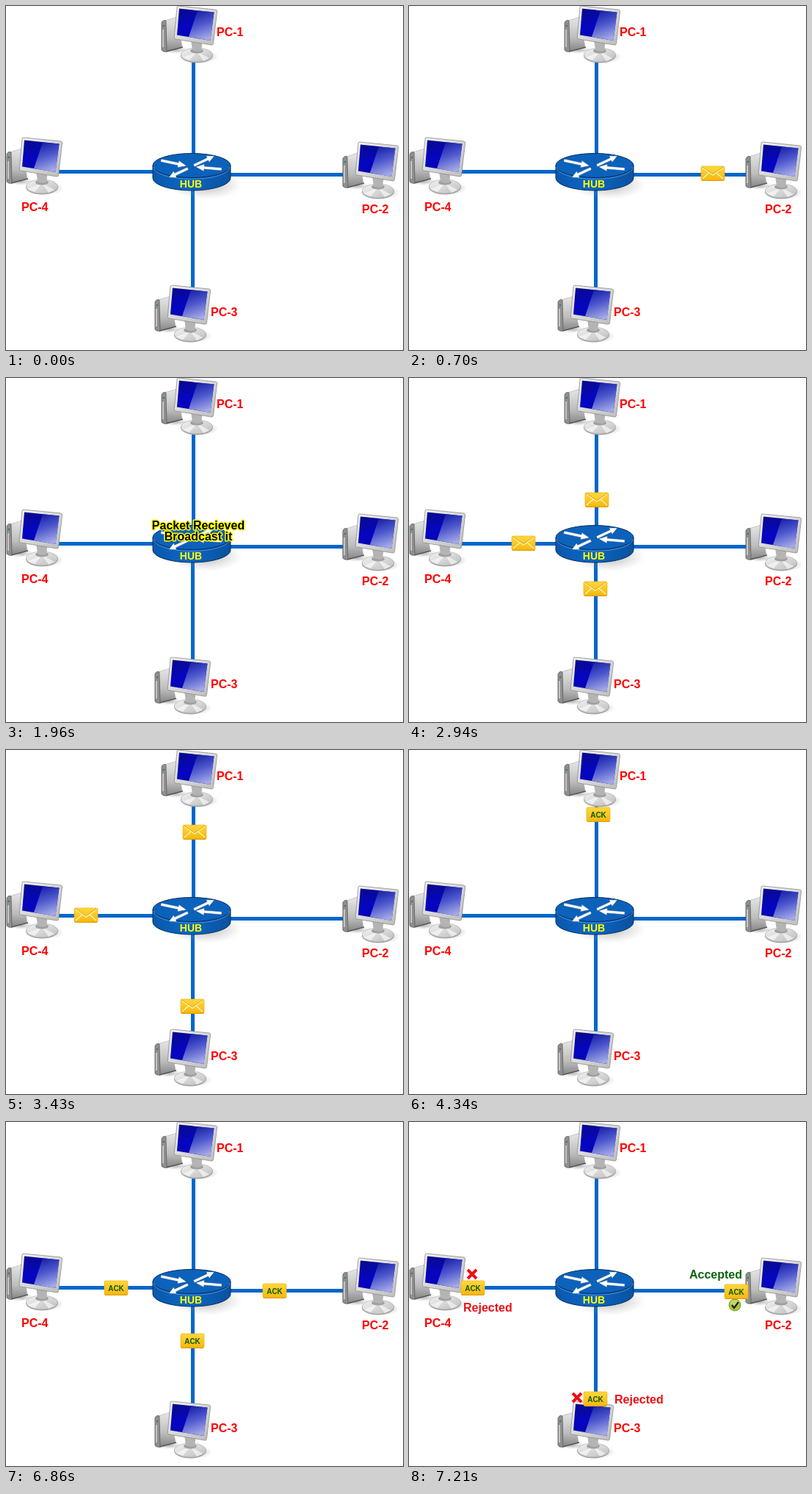
An HTML page that plays this animation: 541 by 468 pixels, repeating every 8010 ms.

```html
<!DOCTYPE html>
<html lang="en">
<head>
<meta charset="utf-8">
<title>Hub broadcast</title>
<style>
html, body { margin: 0; width: 100%; height: 100%; overflow: hidden; background: #fff; }
svg { display: block; width: 541px; height: 468px; }
text { font: bold 16px Arial, "Liberation Sans", sans-serif; }
.pc { fill: #f00; }
.bad { fill: #ed1018; }
.good { fill: #0a640f; }
.notice { fill: #000; stroke: #ff0; stroke-width: 3px; stroke-linejoin: round; paint-order: stroke; text-anchor: middle; }
.hub { font-size: 14px; fill: #ff0; text-anchor: middle; }
.ack { font-size: 10px; fill: #0b5a0b; text-anchor: middle; }
</style>
</head>
<body>
<svg viewBox="0 0 541 468">
  <defs>
    <linearGradient id="screenFill" x1="0" y1="0" x2=".3" y2="1">
      <stop offset="0" stop-color="#0a0a86"/><stop offset=".6" stop-color="#0505c4"/><stop offset="1" stop-color="#0606a8"/>
    </linearGradient>
    <linearGradient id="glare" x1=".2" y1="0" x2=".5" y2="1">
      <stop offset="0" stop-color="#1420a4"/><stop offset=".5" stop-color="#5f6cd0"/><stop offset="1" stop-color="#ccd2f8"/>
    </linearGradient>
    <linearGradient id="silver" x1="0" y1="0" x2="1" y2="1">
      <stop offset="0" stop-color="#f4f4f4"/><stop offset="1" stop-color="#bcbcbc"/>
    </linearGradient>
    <linearGradient id="towerFill" x1="0" y1="0" x2="0" y2="1">
      <stop offset="0" stop-color="#e6e6e6"/><stop offset=".6" stop-color="#bdbdbd"/><stop offset="1" stop-color="#858585"/>
    </linearGradient>
    <linearGradient id="hubSide">
      <stop offset="0" stop-color="#0a58ac"/><stop offset=".45" stop-color="#0c66c4"/><stop offset="1" stop-color="#0a529f"/>
    </linearGradient>
    <linearGradient id="gold" x1="0" y1="0" x2="0" y2="1">
      <stop offset="0" stop-color="#ffd83c"/><stop offset="1" stop-color="#f8b810"/>
    </linearGradient>
    <radialGradient id="shade">
      <stop offset="0" stop-color="#777" stop-opacity=".55"/><stop offset="1" stop-color="#999" stop-opacity="0"/>
    </radialGradient>

    <g id="computer">
      <ellipse cx="20" cy="60" rx="20" ry="5" fill="url(#shade)"/>
      <ellipse cx="57" cy="69" rx="22" ry="9" fill="url(#shade)"/>
      <path d="M5 20L22 15 29 56 7 62Z" fill="url(#towerFill)" stroke="#aaa" stroke-width=".6"/>
      <path d="M7 62L30 56" stroke="#555" stroke-width="1.500"/>
      <path d="M1 23Q3 18 7 20L8 62Q3 63 1 60Z" fill="#8f8f8f" stroke="#5c5c5c" stroke-width=".8"/>
      <path d="M3 32V56" stroke="#d8d8d8" stroke-width="1.500"/>
      <circle cx="4" cy="27" r="1.200" fill="#3b7d48"/>
      <ellipse cx="49" cy="67.500" rx="22" ry="10" fill="#a3a3a3"/>
      <ellipse cx="49" cy="66.500" rx="21.500" ry="9.500" fill="url(#silver)" stroke="#aaa" stroke-width=".6"/>
      <path d="M49 62L30 70 39 74ZM49 62L66 71 58 75Z" fill="#fff" opacity=".6"/>
      <ellipse cx="49" cy="61" rx="9" ry="3.500" fill="#a0a0a0"/>
      <path d="M41 46H57L55 61Q49 63 43 60Z" fill="#b4b4b4"/>
      <path d="M24 0L75 5Q77 5.500 76.500 8L71.500 51Q71 53.500 69 53L20 45Q18 44.500 18.300 42L22 2Q22 0 24 0Z" fill="url(#silver)" stroke="#8c8c8c" stroke-width=".8"/>
      <path d="M25 3.500L72.500 8.500 67.500 47 22 39.500Z" fill="url(#screenFill)"/>
      <path d="M50 6.200L72.500 8.500 67.500 47 38 42Z" fill="url(#glare)" opacity=".8"/>
    </g>

    <g id="box">
      <rect x="-16" y="-9.500" width="32" height="19.500" rx="2" fill="#d99a08"/>
      <rect x="-16" y="-10" width="32" height="18.800" rx="2" fill="url(#gold)" stroke="#f1b414" stroke-width=".7"/>
    </g>
    <g id="mail">
      <use href="#box"/>
      <path d="M-14-8L0 2 14-8M-14 7L-5-1M14 7L5-1" fill="none" stroke="#fff3b5" stroke-width="1.500"/>
      <path d="M-14-9L0 .7 14-9" fill="none" stroke="#d39a10" stroke-width=".8"/>
    </g>
    <g id="ack"><use href="#box"/><text class="ack" y="3.500">ACK</text></g>
    <path id="cross" d="M-6-6L6 6M6-6L-6 6" stroke="#ed1018" stroke-width="4"/>
    <g id="tick">
      <circle r="8" fill="#a9c63f" stroke="#7e9a2c"/>
      <ellipse cy="-3" rx="6" ry="4" fill="#d5e48a" opacity=".6"/>
      <path d="M-4 0L-1 4 5-4" fill="none" stroke="#182006" stroke-width="2.200"/>
    </g>
    <path id="arrow" d="M0-2H24V-5L36 0 24 5V2H0Z" fill="#fff" stroke="#0a4a94" stroke-width=".5"/>
    <g id="rejections">
      <use href="#cross" x="86" y="207"/><text class="bad" x="74" y="258">Rejected</text>
      <use href="#cross" x="229" y="375"/><text class="bad" x="280" y="383">Rejected</text>
    </g>
  </defs>

  <path d="M255.500 70V210M254.500 240V384M70 225.500H210M295 229.500H460" stroke="#0066cc" stroke-width="5"/>

  <use href="#computer" x="211"/>
  <use href="#computer" x="458" y="185"/>
  <use href="#computer" x="202" y="380"/>
  <use href="#computer" y="179"/>
  <g class="pc">
    <text x="287" y="41">PC-1</text><text x="485" y="282">PC-2</text>
    <text x="279" y="422">PC-3</text><text x="21" y="279">PC-4</text>
  </g>

  <g id="packets"></g>

  <ellipse cx="272" cy="243" rx="50" ry="20" fill="url(#shade)"/>
  <path d="M200 217V234A53 17 0 0 0 306 234V217Z" fill="url(#hubSide)" stroke="#062f62"/>
  <ellipse cx="253" cy="217" rx="53" ry="16.500" fill="#0c62ba" stroke="#062f62"/>
  <path d="M201 219A52 16.500 0 0 0 305 219" fill="none" stroke="#5c9ad8" stroke-width=".8"/>
  <use href="#arrow" transform="translate(211 210) rotate(12)"/>
  <use href="#arrow" transform="translate(256 217) rotate(-25) scale(.86 1)"/>
  <use href="#arrow" transform="translate(294 222) rotate(185)"/>
  <use href="#arrow" transform="translate(248 221) rotate(155) scale(.8 1)"/>
  <text class="hub" x="252" y="247">HUB</text>

  <g id="delivered">
    <use href="#rejections"/>
    <use href="#tick" x="229" y="89"/><text class="good" x="275" y="97">Accepted</text>
  </g>
  <g id="confirmed">
    <use href="#rejections"/>
    <use href="#tick" x="444" y="249"/><text class="good" x="382" y="213">Accepted</text>
  </g>
  <g id="notice">
    <text class="notice" x="262" y="206" id="headline"></text>
    <text class="notice" x="262" y="221">Broadcast it</text>
  </g>
</svg>
<script>
const LOOP = 8010, STEP = 70;
const $ = id => document.getElementById(id);

// Each trip: kind, start time, arrival time, removal time, from, to, acceleration share.
const trips = [
  ["mail", 70, 1890, 1960, [445, 228], [322, 228], .41],
  ["mail", 2660, 3640, 4340, [256, 196], [257, 88], .05],
  ["mail", 2660, 3640, 4340, [254, 254], [254, 377], .1],
  ["mail", 2660, 3640, 4340, [180, 225], [87, 225], .12],
  ["ack", 4340, 4340, 5040, [258, 88], [258, 88], 0],
  ["ack", 5040, 5740, 5810, [258, 94], [256, 193], .3],
  ["ack", 6510, 7210, LOOP, [325, 230], [446, 231], .64],
  ["ack", 6510, 7210, LOOP, [254, 253], [254, 377], .56],
  ["ack", 6510, 7210, LOOP, [180, 226], [87, 226], .7]
].map(([kind, start, arrive, end, from, to, accel]) => {
  const node = document.createElementNS("http://www.w3.org/2000/svg", "use");
  node.setAttribute("href", "#" + kind);
  $("packets").append(node);
  return { node, start, arrive, end, from, to, accel };
});

const show = (node, visible) => node.style.display = visible ? "" : "none";
const between = (t, a, b) => t >= a && t < b;

function draw(now) {
  const t = Math.floor(now % LOOP / STEP) * STEP;
  for (const { node, start, arrive, end, from, to, accel } of trips) {
    const u = Math.max(0, Math.min(1, (t - start) / (arrive - start || 1)));
    const f = u * (1 - accel + accel * u);
    const [x, y] = from.map((v, i) => Math.round(v + (to[i] - v) * f));
    node.setAttribute("transform", `translate(${x} ${y})`);
    show(node, between(t, start, end));
  }
  show($("delivered"), between(t, 3640, 4340));
  show($("confirmed"), t >= 7210);
  show($("notice"), between(t, 1960, 2660) || between(t, 5810, 6510));
  $("headline").textContent = t < 4000 ? "Packet Recieved" : "Acknowledgement Recieved";
}

function tick() {
  draw(performance.now());
  requestAnimationFrame(tick);
}
tick();
</script>
</body>
</html>
```
